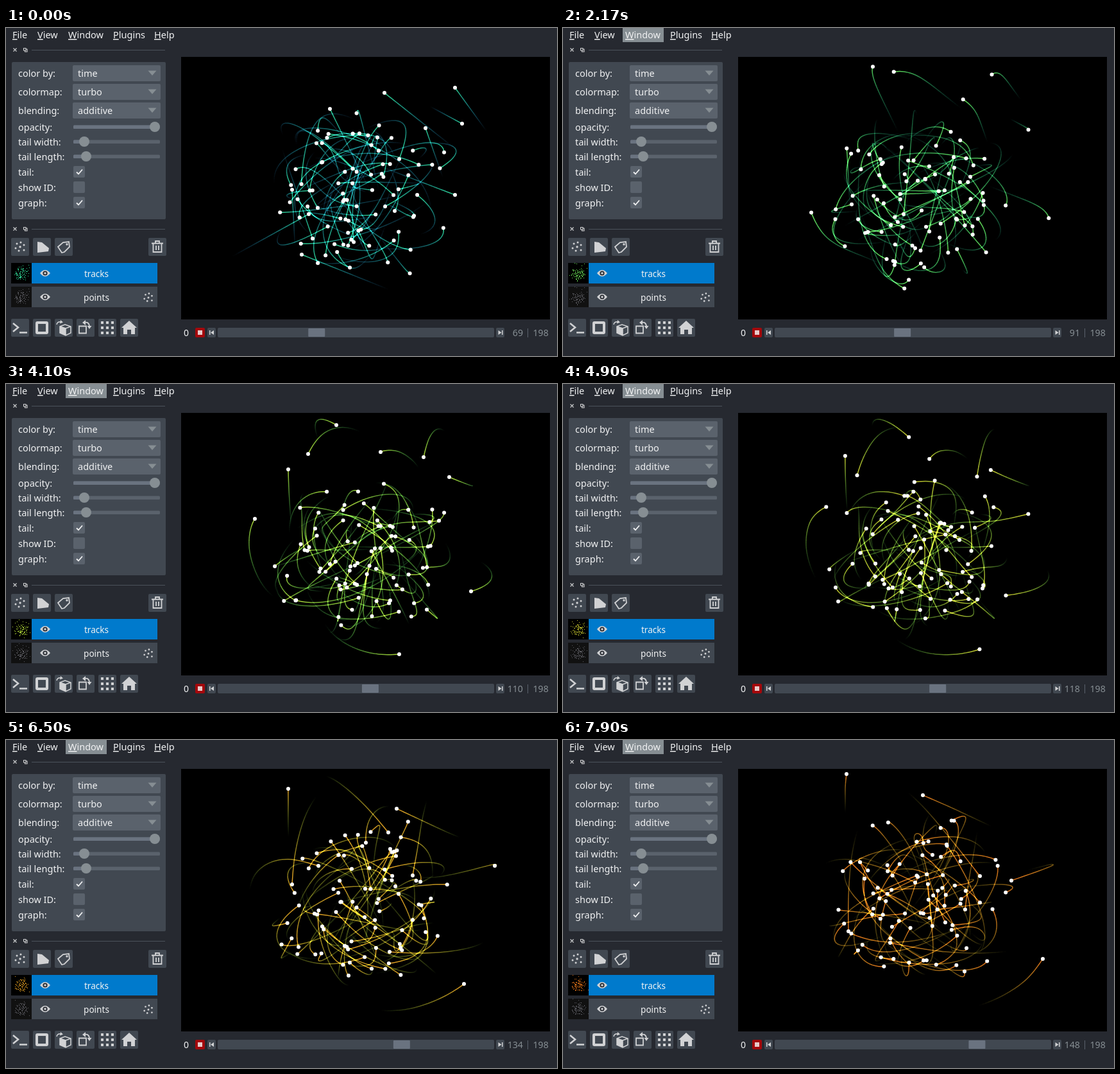
An HTML page with a canvas that plays this animation: 859x511 px, repeating every 8000 ms.

```html
<!DOCTYPE html>
<html lang="en">
<head>
<meta charset="utf-8">
<title>Tracks viewer</title>
<style>
html, body { margin: 0; width: 100%; height: 100%; overflow: hidden; background: #262930; }
svg, canvas { position: absolute; left: 0; top: 0; width: 859px; height: 511px; }
text { font: 14.5px "Noto Sans", "Open Sans", sans-serif; fill: #f0f1f2; }
.menu tspan { text-decoration: underline; }
.layer { font-size: 13.6px; text-anchor: middle; }
.dim { font-size: 14.2px; fill: #868e93; }
.panel { fill: #414851; }
.field { fill: #5a626c; }
.knob { fill: #868e93; }
.icon { fill: #d1d2d4; }
.line { fill: none; stroke: #d1d2d4; stroke-width: 1.8; }
</style>
</head>
<body>
<svg viewBox="0 0 859 511">
  <defs>
    <g id="head">
      <path d="M11.5-2.5l5 5m0-5l-5 5M27.5-2.5h3.5v3.5h-3.5zM29.5 1v2h3.5v-4h-2" fill="none" stroke="#d1d2d4" stroke-width="1.1"/>
      <path d="M40 .5H248" stroke="#4b525b"/>
    </g>
    <rect id="btn" class="panel" width="28" height="28" rx="2"/>
    <g id="combo"><rect class="field" width="137" height="25" rx="2"/><path class="knob" d="M117.500 8.500h13l-6.500 7.500z"/></g>
    <g id="track"><rect class="field" width="135" height="5.500" rx="1.500"/></g>
    <rect id="box" class="field" width="18" height="18" rx="2"/>
    <path id="tick" d="M5 9.500l3 3 6-7" fill="none" stroke="#f0f1f2" stroke-width="1.8"/>
    <g id="eye"><path class="icon" d="M-8 0Q0-10 8 0Q0 10-8 0z"/><circle r="3.600" fill="#262930"/><circle r="1.800" class="icon"/></g>
    <g id="dots" class="icon">
      <circle cx="-5" cy="-5" r="1.500"/><circle cx="1" cy="-7" r="1.500"/><circle cx="6" cy="-3" r="1.500"/>
      <circle r="1.700"/><circle cx="-7" cy="2" r="1.500"/><circle cx="6" cy="5" r="1.500"/><circle cx="-2" cy="6" r="1.500"/>
    </g>
  </defs>

  <rect id="hover" x="93" y="0" width="64" height="22" fill="#868e93"/>
  <g class="menu">
    <text x="10" y="16"><tspan>F</tspan>ile</text>
    <text x="49" y="16"><tspan>V</tspan>iew</text>
    <text x="97" y="16"><tspan>W</tspan>indow</text>
    <text x="167" y="16"><tspan>P</tspan>lugins</text>
    <text x="231" y="16"><tspan>H</tspan>elp</text>
  </g>

  <use href="#head" y="34"/>
  <rect class="panel" x="9" y="53" width="240" height="245" rx="2"/>
  <use href="#combo" x="104" y="58"/><use href="#combo" x="104" y="87"/><use href="#combo" x="104" y="116"/>
  <text x="19" y="76">color by:</text><text x="112" y="76">time</text>
  <text x="19" y="105">colormap:</text><text x="112" y="105">turbo</text>
  <text x="19" y="134">blending:</text><text x="112" y="134">additive</text>
  <text x="19" y="160">opacity:</text>
  <text x="19" y="183">tail width:</text>
  <text x="19" y="206">tail length:</text>
  <text x="19" y="230">tail:</text>
  <text x="19" y="254">show ID:</text>
  <text x="19" y="278">graph:</text>
  <use href="#track" x="105" y="151.500"/><use href="#track" x="105" y="174.500"/><use href="#track" x="105" y="197.500"/>
  <rect x="105" y="151.500" width="127" height="5.500" rx="1.500" fill="#6a7380"/>
  <rect x="105" y="174.500" width="17" height="5.500" rx="1.500" fill="#6a7380"/>
  <rect x="105" y="197.500" width="20" height="5.500" rx="1.500" fill="#6a7380"/>
  <g class="knob"><circle cx="232" cy="154" r="8"/><circle cx="122" cy="177" r="8"/><circle cx="125" cy="200" r="8"/></g>
  <use href="#box" x="105" y="215"/><use href="#box" x="105" y="239"/><use href="#box" x="105" y="263"/>
  <use href="#tick" x="105" y="215"/><use href="#tick" x="105" y="263"/>

  <use href="#head" y="313"/>
  <use href="#btn" x="8" y="327"/><use href="#btn" x="42" y="327"/><use href="#btn" x="76" y="327"/><use href="#btn" x="222" y="327"/>
  <use href="#dots" x="22" y="341"/>
  <path class="icon" d="M49 333l7 1 11 9-1 5-17 2z"/>
  <path class="line" d="M81 341l8-7 9-1 1 8-8 8-4 1z"/><circle class="icon" cx="95" cy="337" r="1.700"/>
  <path class="line" d="M227 335.500h18M233 335v-3h6v3M229.500 336v13h13v-13M234 339v7M238 339v7"/>

  <rect x="8" y="366" width="228" height="32" fill="#007acc"/>
  <rect x="8" y="366" width="32" height="32" fill="#000"/>
  <rect class="panel" x="8" y="403" width="228" height="32"/>
  <rect x="8" y="403" width="32" height="32" fill="#111"/>
  <use href="#eye" x="61" y="382"/><use href="#eye" x="61" y="419"/>
  <text class="layer" x="141" y="388">tracks</text>
  <text class="layer" x="141" y="425">points</text>
  <use href="#dots" transform="translate(222 420) scale(.9)"/>

  <g id="tools"></g>
  <path d="M11 460l8 6.500-8 6.500M21 474.500h12" class="line" style="stroke-width:2.500"/>
  <rect x="48" y="459" width="16" height="16" rx="1" class="line" style="stroke-width:4"/>
  <path class="line" style="stroke-width:1.500" d="M84 465l8-3 9 3v10l-8 4-9-4zM84 465l9 3 8-3M93 468v11M79 462q1-5 7-4"/>
  <path class="icon" d="M84 465l9 3v11l-9-4zM85 455l4 3.500-5 2z"/>
  <path class="line" d="M114 464.500h11v11h-11zM122 459q8-2 8 7"/>
  <path class="icon" d="M124 455v8l-5-4zM126.500 464h7l-3.500 5z"/>
  <path class="icon" d="M148 457h4v4h-4zm8 0h4v4h-4zm8 0h4v4h-4zM148 465h4v4h-4zm8 0h4v4h-4zm8 0h4v4h-4zM148 473h4v4h-4zm8 0h4v4h-4zm8 0h4v4h-4z"/>
  <path class="icon" d="M192 456l12 11h-3v10h-6v-7h-6v7h-6v-10h-3z"/>

  <rect x="273" y="45" width="575" height="409" fill="#000"/>
  <text x="277" y="480" style="font-size:14px">0</text>
  <rect x="295" y="467" width="15" height="15" rx="2" fill="#a4080c"/>
  <rect x="299" y="471" width="7" height="7" fill="#e8c9c9"/>
  <g class="panel"><rect x="314" y="467" width="13" height="15" rx="2"/><rect x="330" y="467" width="431" height="15" rx="2"/><rect x="764" y="467" width="13" height="15" rx="2"/></g>
  <path class="icon" d="M317 471h1.500v7h-1.500zM324 471v7l-5-3.500zM773 471h1.500v7h-1.500zM767.500 471v7l5-3.500z"/>
  <rect id="thumb" y="468" width="26" height="13" rx="1" fill="#6a7380"/>
  <text id="count" class="dim" x="806" y="480" text-anchor="end">69</text>
  <path d="M813.500 468v14" stroke="#5a626c"/>
  <text class="dim" x="821.500" y="480">198</text>
</svg>
<canvas id="stage" width="859" height="511"></canvas>
<script>
const get = id => document.getElementById(id);
const ctx = get('stage').getContext('2d');
const LOOP = 8000, FIRST = 69, LAST = 198, TAIL = 30;

for (let x = 8; x <= 178; x += 34)
  get('tools').innerHTML += `<use href="#btn" x="${x}" y="453"/>`;

// Outer tracks: x, y at each key time
const KEYS = [69, 82, 99, 110, 126, 134, 148];
const OUTER = [
  [700,93, 680,71, 660,84, 651,114, 640,178, 634,211, 627,264],
  [711,149, 727,158, 716,155, 691,145, 639,121, 609,107, 561,86],
  [590,101, 544,71, 494,78, 471,109, 450,182, 446,225, 445,298],
  [505,126, 484,78, 491,55, 515,64, 567,110, 596,144, 650,212],
  [446,252, 444,214, 441,164, 440,133, 440,93, 440,76, 442,53],
  [461,353, 409,324, 379,252, 388,210, 444,186, 487,196, 549,222],
  [700,260, 746,281, 753,309, 725,323, 647,332, 598,330, 510,316],
  [472,290, 525,261, 606,218, 675,213, 760,194, 762,196, 699,219],
  [478,328, 503,382, 564,418, 613,421, 684,399, 714,380, 748,341],
  [654,156, 640,126, 607,104, 584,106, 563,135, 561,160, 576,179]
];

// Smooth curve through the key values, straight beyond both ends
function spline(v) {
  const n = KEYS.length, h = [], d = [], m = [];
  for (let i = 0; i < n - 1; i++) {
    h[i] = KEYS[i + 1] - KEYS[i];
    d[i] = (v[i + 1] - v[i]) / h[i];
  }
  for (let i = 1; i < n - 1; i++) m[i] = (d[i - 1] * h[i] + d[i] * h[i - 1]) / (h[i - 1] + h[i]);
  m[0] = 1.5 * d[0] - 0.5 * m[1];
  m[n - 1] = 1.5 * d[n - 2] - 0.5 * m[n - 2];
  return t => {
    if (t <= KEYS[0]) return v[0] + m[0] * (t - KEYS[0]);
    let i = 0;
    while (i < n - 2 && t > KEYS[i + 1]) i++;
    const s = (t - KEYS[i]) / h[i], r = 1 - s;
    return r * r * ((1 + 2 * s) * v[i] + s * h[i] * m[i]) +
           s * s * ((3 - 2 * s) * v[i + 1] - r * h[i] * m[i + 1]);
  };
}

let seed = 20;
function rnd() {
  seed = (seed + 0x6D2B79F5) | 0;
  let a = Math.imul(seed ^ (seed >>> 15), 1 | seed);
  a = (a + Math.imul(a ^ (a >>> 7), 61 | a)) ^ a;
  return ((a ^ (a >>> 14)) >>> 0) / 4294967296;
}
function disc(r) {
  const a = rnd() * 2 * Math.PI, q = r * Math.sqrt(rnd());
  return [q * Math.cos(a), q * Math.sin(a)];
}

// Inner particles swing about the middle, with a smaller second swing
function orbit() {
  const u = disc(120), v = disc(120), e = disc(22);
  const w = 0.03 + 0.03 * rnd(), k = w * (1.8 + rnd()), p = rnd() * 6.28;
  return t => {
    const c = Math.cos(w * t), s = Math.sin(w * t);
    return [553 + u[0] * c + v[0] * s + e[0] * Math.cos(k * t + p),
            258 + u[1] * c + v[1] * s + e[1] * Math.sin(k * t + p)];
  };
}

const movers = OUTER.map(row => {
  const x = spline(row.filter((_, i) => i % 2 === 0));
  const y = spline(row.filter((_, i) => i % 2 === 1));
  return t => [x(t), y(t)];
});
while (movers.length < 92) movers.push(orbit());

const poly = (x, c) => c.reduceRight((sum, k) => sum * x + k, 0);
function turbo(x, alpha) {
  const rgb = [
    [0.1357, 4.6154, -42.6603, 132.1311, -152.9424, 59.2864],
    [0.0914, 2.1942, 4.8430, -14.1850, 4.2773, 2.8296],
    [0.1067, 12.6419, -60.5820, 110.3628, -89.9031, 27.3482]
  ].map(c => Math.round(255 * Math.min(1, Math.max(0, poly(x, c)))));
  return `rgba(${rgb},${alpha})`;
}

function drawTracks(step) {
  ctx.save();
  ctx.beginPath();
  ctx.rect(273, 45, 575, 409);
  ctx.clip();
  ctx.globalCompositeOperation = 'lighter';
  ctx.lineWidth = 1.5;
  for (let age = TAIL; age > 0; age--) {
    ctx.strokeStyle = turbo((step - age + 0.5) / LAST, 0.9 * (1 - (age - 0.5) / TAIL));
    ctx.beginPath();
    for (const at of movers) {
      ctx.moveTo(...at(step - age));
      ctx.lineTo(...at(step - age + 1));
    }
    ctx.stroke();
  }
  ctx.fillStyle = '#fff';
  for (const at of movers) {
    const [x, y] = at(step);
    ctx.beginPath();
    ctx.arc(x, y, 3, 0, 7);
    ctx.fill();
  }
  ctx.restore();
}

function drawThumb(step, top, color) {
  ctx.fillStyle = color;
  for (const at of movers) {
    const [x, y] = at(step);
    const px = Math.round(23.5 + (x - 553) * 0.08), py = Math.round(top + 15.5 + (y - 250) * 0.08);
    if (px >= 8 && px < 40 && py >= top && py < top + 32) ctx.fillRect(px, py, 1, 1);
  }
}

let shown = -1;
function draw(step) {
  ctx.clearRect(0, 0, 859, 511);
  drawTracks(step);
  drawThumb(step, 366, turbo(step / LAST, 0.9));
  drawThumb(step, 403, 'rgba(150,150,160,.55)');
  get('count').textContent = step;
  get('thumb').setAttribute('x', 330.5 + 2.04 * step);
  get('hover').setAttribute('visibility', step > 72 ? 'visible' : 'hidden');
}

const start = performance.now();
function tick() {
  const t = (performance.now() - start) % LOOP;
  const step = FIRST + Math.floor((t < 4000 ? t + 30 : t) / 100);
  if (step !== shown) draw(shown = step);
  requestAnimationFrame(tick);
}
tick();
</script>
</body>
</html>
```
